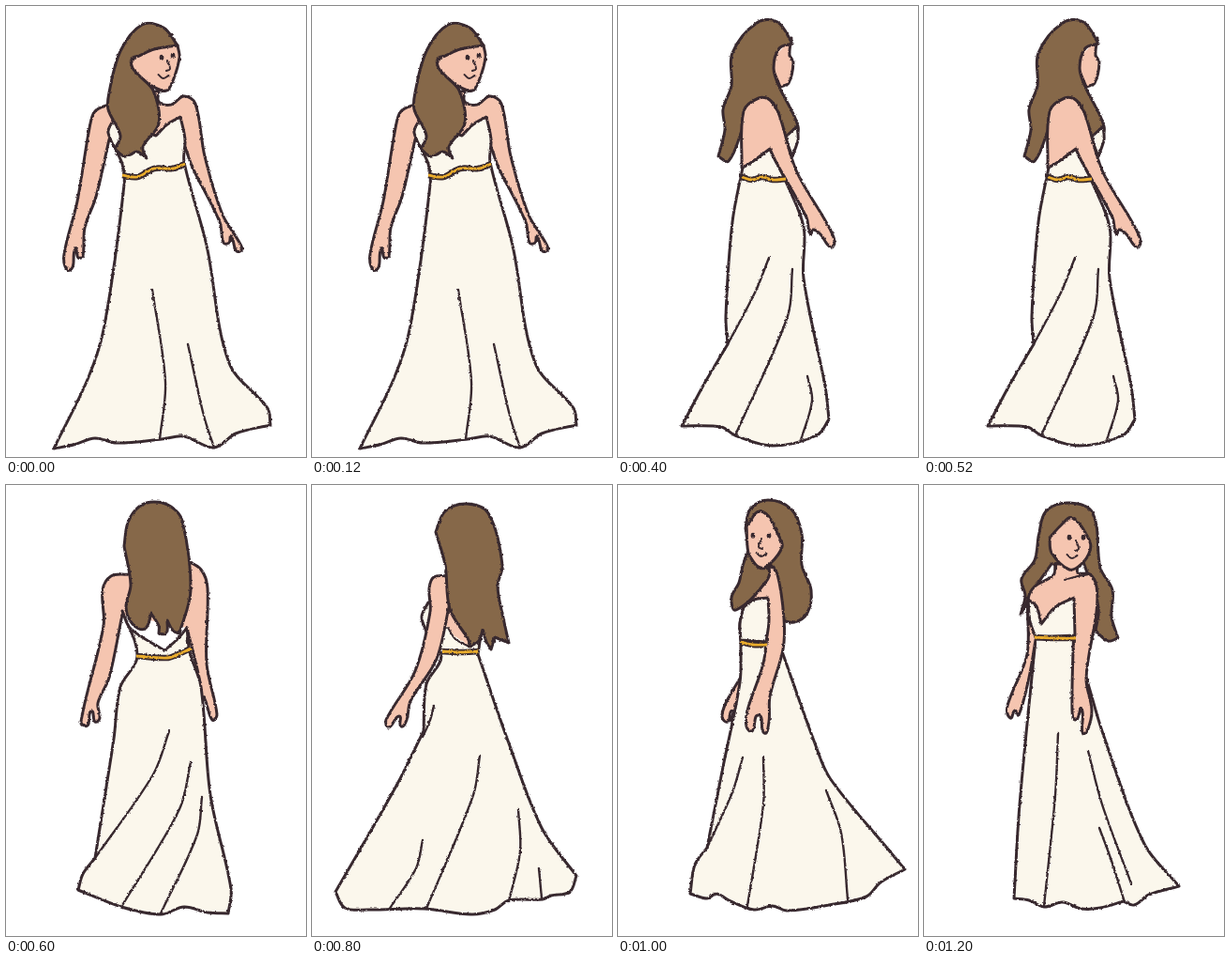
Write an HTML page that moves like this. It is 320 px wide and 480 px high and loops after 1.4 s.

```html
<!DOCTYPE html>
<html lang="en">
<head>
<meta charset="utf-8">
<title>Turning dress</title>
<style>
html, body { margin: 0; width: 100%; height: 100%; overflow: hidden; background: #fff; }
svg { display: block; width: 100vw; height: 100vh; }
path { stroke: #38292f; stroke-width: 3; stroke-linejoin: round; stroke-linecap: round; fill: none; }
.skin { fill: #f5c5b0; }
.bare { fill: #f5c5b0; stroke: none; }
.dress { fill: #fbf7ec; }
.hair { fill: #866849; }
.fold { stroke-width: 2.4; }
.fine { stroke-width: 2; }
.band { stroke-width: 6.5; stroke-linecap: butt; }
.gold { stroke: #e9ac2c; stroke-width: 2.8; stroke-linecap: butt; }
.eye { stroke-width: 4.6; }
</style>
</head>
<body>
<svg id="stage" viewBox="0 0 320 480">
  <filter id="rough" x="0" y="0" width="320" height="480" filterUnits="userSpaceOnUse" color-interpolation-filters="sRGB">
    <feTurbulence type="fractalNoise" baseFrequency=".35" numOctaves="2" seed="4"/>
    <feDisplacementMap in="SourceGraphic" scale="2.6" xChannelSelector="R" yChannelSelector="G"/>
  </filter>
</svg>
<script>
const STEP = 200, COUNT = 7, TOTAL = STEP * COUNT;
const stage = document.getElementById('stage');
let group, shown = 0;

function add(parent, tag, attrs) {
  const node = document.createElementNS('http://www.w3.org/2000/svg', tag);
  for (const key in attrs) node.setAttribute(key, attrs[key]);
  return parent.appendChild(node);
}

// Point reached from p when leaving along the direction a to b.
function handle(p, a, b, reach) {
  const dx = b[0] - a[0], dy = b[1] - a[1], k = reach / (Math.hypot(dx, dy) || 1);
  return [p[0] + dx * k, p[1] + dy * k].map(v => v.toFixed(1));
}

// Smooth line through points; "|" marks a corner, a final "z" closes it.
function curve(text) {
  let d = '', last = null;
  for (const run of text.replace('z', '').split('|')) {
    const n = run.trim().split(/\s+/).map(Number);
    const p = last ? [last] : [];
    for (let i = 0; i < n.length; i += 2) p.push([n[i], n[i + 1]]);
    if (!last) d = 'M' + p[0];
    for (let i = 0; i + 1 < p.length; i++) {
      const b = p[i], c = p[i + 1], a = p[i - 1] || b, e = p[i + 2] || c;
      const reach = Math.hypot(c[0] - b[0], c[1] - b[1]) / 3;
      d += `C${handle(b, a, c, reach)} ${handle(c, e, b, reach)} ${c}`;
    }
    last = p[p.length - 1];
  }
  return d + (text.endsWith('z') ? 'Z' : '');
}

const pen = name => text => add(group, 'path', { class: name, d: curve(text) });
const skin = pen('skin'), bare = pen('bare'), dress = pen('dress'), hair = pen('hair');
const fold = pen('fold'), fine = pen('fine'), eye = pen('eye');
const band = pen('band'), gold = pen('gold');
const belt = text => { band(text); gold(text); };

// Eyes at x and x + gap, nose at n pointing to side.
function face(x, y, gap, n, side, tilt = 0) {
  eye(`${x} ${y} ${x} ${y + 1.5}`);
  eye(`${x + gap} ${y + tilt} ${x + gap} ${y + tilt + 1.5}`);
  fine(`${n} ${y + 4} ${n + 3 * side} ${y + 13} ${n - side} ${y + 15}`);
  const m = n - 7.5 - 2 * side;
  fine(`${m} ${y + 19} ${m + 5} ${y + 23} ${m + 11} ${y + 20}`);
}

// Starts the next pose and its turn in the loop.
function pose() {
  group = add(stage, 'g', { filter: 'url(#rough)', opacity: shown ? 0 : 1 });
  group.animate([
    { opacity: 1, offset: 0, easing: 'step-end' },
    { opacity: 0, offset: 1 / COUNT, easing: 'step-end' },
    { opacity: 0, offset: 1 }
  ], { duration: TOTAL, delay: shown++ * STEP - TOTAL, iterations: Infinity });
}

// Front, looking right
pose();
skin('110 142 96 203 84 236 82 266 77 268 74 258 71 278 65 281 62 264 76 208 89 130 95 112 112 104 | 163 90 | 163 102 176 105 190 96 202 104 212 160 231 222 252 258 246 261 240 245 238 252 232 252 228 230 199 172 191 150');
dress('186 118 | 172 126 160 138 | 114 122 | 109 135 124 168 126 190 105 340 88 395 51 471 | 72 467 95 460 118 465 166 461 190 458 222 470 245 455 282 446 | 279 428 238 380 214 255 190 166 191 142 186 118 z');
fold('156 302 170 400 164 461');
fold('194 360 211 436 222 470');
belt('124 180 140 182 158 173 178 173 191 168');
skin('183 42 185 56 174 88 166 90 140 75 132 64 150 40');
hair('183 42 168 23 145 20 122 48 110 92 109 110 122 138 116 152 | 126 160 133 158 | 140 155 150 162 | 146 150 163 125 157 90 142 74 135 66 134 56 142 53 158 46 183 42 z');
face(166, 54, 12, 172, 1, -2);

// Front, turned further right
pose();
skin('127 150 118 200 118 240 124 262 113 254 117 270 112 275 100 258 104 180 107 115 | 160 88 | 161 98 174 92 187 95 192 108 190 130 208 190 233 238 229 245 219 233 212 232 207 225 208 213 184 162');
dress('179 110 | 175 125 164 138 | 152 124 | 128 140 | 124 150 132 190 118 290 105 350 62 459 | 80 468 118 464 165 475 185 464 217 459 | 230 443 245 445 266 433 | 235 395 219 350 208 240 183 162 | 187 148 179 110 z');
fold('198 328 200 370 217 459');
fold('175 391 166 430 168 473');
belt('132 175 146 177 160 170 173 169 184 160');
skin('179 42 180 56 171 86 160 89 138 72 133 60 150 36');
hair('180 46 176 31 150 18 123 36 114 80 105 105 107 128 117 139 114 145 | 128 139 | 130 152 138 160 | 141 150 139 142 | 150 132 158 116 150 86 136 66 133 57 139 52 161 32 171 35 180 46 z');
face(157, 53, 15, 167, 1);

// Side of the back
pose();
skin('185 34 183 52 187 60 182 82 173 86 | 162 60');
hair('186 40 170 17 148 18 122 50 121 85 112 110 114 132 107 160 | 118 165 133 130 | 160 130 | 186 142 192 128 172 86 166 66 172 45 186 40 z');
dress('191 128 192 142 186 160 | 178 140 z');
dress('133 172 | 162 152 | 177 182 | 198 235 198 290 221 405 225 440 | 212 457 165 468 125 457 110 448 68 447 | 92 402 117 360 | 115 330 122 230 133 172 z');
fold('161 268 147 303 117 360');
fold('186 280 181 330 125 457');
fold('202 394 207 420 195 462');
skin('132 171 134 112 150 98 162 100 172 116 190 175 222 230 231 250 227 257 216 243 208 238 205 243 201 225 168 165 162 152 | 140 168 132 172');
belt('132 182 143 185 154 182 165 185 179 184');

// Back, weight to the left
pose();
skin('124 138 110 205 98 232 100 248 95 252 91 241 87 256 80 252 104 150 103 112 112 97 130 95 | 192 80 | 208 90 215 110 214 190 225 244 220 250 211 226 208 232 207 210 193 152');
dress('124 134 | 133 153 169 176 | 182 165 193 152 | 196 178 208 215 218 330 240 430 237 456 | 215 455 190 449 165 457 123 449 77 431 | 82 414 95 397 | 115 270 122 215 140 182 124 134 z');
fold('174 262 157 308 95 397');
fold('197 295 185 345 123 449');
fold('209 332 204 372 165 456');
belt('139 182 172 184 184 180 197 174');
hair('126 65 130 40 142 23 158 18 176 23 188 38 197 112 185 158 | 178 155 172 144 | 171 158 163 158 | 163 150 155 137 | 148 153 135 148 128 130 133 106 126 65 z');

// Back, turned left
pose();
dress('124 125 117 140 122 156 | 138 182 122 212 119 262 | 90 320 25 433 | 35 450 60 452 120 451 170 457 195 452 210 442 246 441 255 437 275 433 282 416 | 245 365 210 275 177 180 | 180 160 | 146 130 | 124 125 z');
fold('130 235 126 250 118 268');
fold('179 288 172 330 122 451');
fold('118 378 111 408 82 452');
fold('220 345 222 390 210 443');
fold('242 408 245 440');
bare('140 120 | 145 152 168 172 | 172 130 z');
fine('145 152 153 164 168 172 | 180 165');
belt('139 177 158 178 178 177');
skin('146 97 130 98 125 110 126 135 110 198 79 250 82 258 93 246 95 257 101 250 105 230 133 185 146 130');
hair('132 50 142 28 165 20 188 30 203 85 198 108 205 146 210 168 | 195 162 | 191 175 | 186 167 182 154 | 178 166 168 172 | 167 165 147 132 142 85 132 50 z');

// Front, facing left
pose();
hair('136 46 141 26 160 16 185 26 196 52 196 85 206 112 202 136 188 146 176 142 167 92 | 140 70 z');
skin('130 206 115 232 111 247 117 252 122 240 122 252 128 238');
dress('134 130 | 160 120 | 176 180 | 210 275 226 312 290 390 306 409 | 280 423 265 438 225 447 180 453 165 448 145 452 120 443 105 435 95 440 77 435 | 82 404 95 386 | 112 300 130 210 131 168 | 130 148 134 130 z');
fold('133 290 122 327 95 386');
fold('155 290 155 340 138 448');
fold('222 325 238 370 245 441');
skin('133 128 150 108 160 98 | 162 84 | 170 95 177 142 176 175 162 225 161 252 156 264 150 245 143 262 137 257 138 240 156 185 160 122');
dress('134 130 145 122 160 120 | 161 145 158 167 | 131 165 | 130 148 134 130 z');
belt('131 167 144 170 159 170');
skin('137 44 140 76 152 88 163 83 175 66 172 55 153 28 137 44 z');
hair('138 72 133 86 129 104 121 120 126 133 157 104 161 90 150 88 138 72 z');
face(144, 53, 17, 153, -1);

// Front, facing right again
pose();
hair('122 55 130 28 155 19 180 30 188 88 201 112 200 140 207 163 | 196 166 183 155 | 186 130 170 82 | 136 84 | 118 110 103 138 | 108 118 104 100 118 80 122 55 z');
dress('119 164 102 340 96 440 | 112 442 128 449 148 444 168 451 188 450 213 443 | 224 447 240 436 272 427 | 235 382 190 262 176 215 | 161 162 | 119 164 z');
fold('143 264 140 330 128 448');
fold('175 283 190 340 221 424');
fold('187 365 200 400 214 444');
skin('119 165 112 205 101 245 97 240 92 248 89 235 110 180 111 122 118 108 138 96 140 84 | 165 84 | 164 93 177 95 184 108 184 135 173 205 179 240 174 262 169 264 168 238 162 250 158 240 160 145');
fine('150 101 164 97 177 95');
dress('111 122 120 129 125 148 | 140 130 160 120 | 161 160 | 119 162 | 113 145 111 122 z');
belt('118 162 138 163 162 163');
skin('134 56 136 72 155 90 168 84 177 70 176 58 158 35 146 43 134 56 z');
face(155, 55, 15, 162, 1);
</script>
</body>
</html>
```
